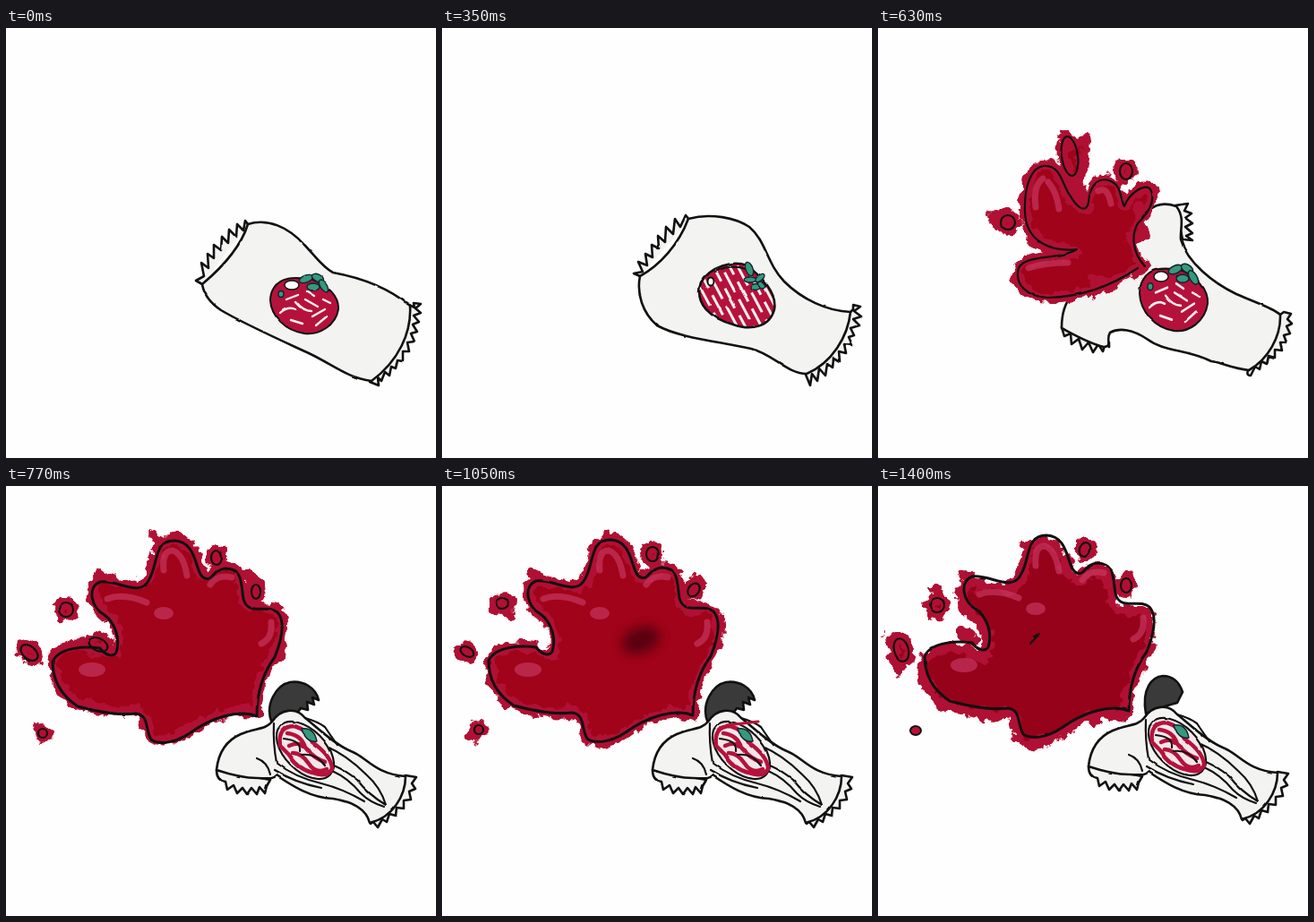
These frames come from a looping animation (480 px wide and 480 px high, 1.47 s). An HTML page without scripts:

```html
<!DOCTYPE html>
<html lang="en">
<head>
<meta charset="utf-8">
<title>Ketchup packet</title>
<style>
html, body { margin: 0; width: 100%; height: 100%; overflow: hidden; background: #fefefe; }
svg { display: block; width: 100%; height: 100%; }
path, ellipse { stroke-linecap: round; stroke-linejoin: round; }

.paper { fill: #f3f3f1; stroke: #111; stroke-width: 2.6; }
.line { fill: none; stroke: #111; stroke-width: 3; }
.fine { stroke-width: 2.2; }
.paint { fill: #a0031a; stroke: #b01033; stroke-width: 12; }
.dark { fill: #96021a; }
.shine { fill: none; stroke: #c93a64; stroke-width: 7; opacity: .65; }
.shine ellipse { fill: #c93a64; stroke: none; }
.skin { fill: #b5123b; stroke: #111; stroke-width: 2; }
.gloss { fill: none; stroke: #f6eef0; stroke-width: 2.4; }
.leaf { fill: #35997a; stroke: #123; stroke-width: 1.4; }
.scribble { fill: none; stroke: #b5123b; stroke-width: 4.5; }
.cap { fill: #3a3a3a; stroke: #111; stroke-width: 2.6; }
.ink { filter: url(#ink); }

/* Each tick is 70 ms; --k is the tick on which a drawing appears. */
.tick, .four, .eight, .nine {
  animation: tick 1470ms steps(1) infinite;
  animation-delay: calc(var(--k) * 70ms - 1471ms);
}
.four { animation-name: four; }
.eight { animation-name: eight; }
.nine { animation-name: nine; }
@keyframes tick { 0% { opacity: 1 } 4.7619%, 100% { opacity: 0 } }
@keyframes four { 0% { opacity: 1 } 19.0476%, 100% { opacity: 0 } }
@keyframes eight { 0% { opacity: 1 } 38.0952%, 100% { opacity: 0 } }
@keyframes nine { 0% { opacity: 1 } 42.8571%, 100% { opacity: 0 } }

.boil { animation: boil 210ms steps(1) infinite; animation-delay: calc(var(--k) * 70ms - 211ms); }
@keyframes boil { 0% { opacity: 1 } 33.3333%, 100% { opacity: 0 } }

.body, .left, .right { animation: swell 1470ms -1ms infinite; }
.left { animation-name: frill-left; }
.right { animation-name: frill-right; }
@keyframes swell {
  0% { animation-timing-function: steps(5);
    d: path("M270 219C292 212 315 222 333 242C343 252 353 267 365 273C398 279 428 291 451 310C453 340 438 372 408 394C382 391 365 376 340 364C310 350 265 330 240 315C228 307 221 298 219 286C238 270 262 245 270 219Z") }
  23.8095% { animation-timing-function: steps(3);
    d: path("M275 213C300 206 328 212 343 222C362 238 362 262 382 283C402 303 430 316 456 317C453 345 435 374 407 386C385 386 370 364 345 358C310 350 265 346 240 332C224 318 217 297 221 277C243 265 264 242 275 213Z") }
  38.0952%, 100% {
    d: path("M275 211C302 198 338 202 352 220C370 240 364 268 386 288C404 306 430 317 456 317C453 345 435 374 407 386C387 386 368 368 345 364C310 360 260 358 236 340C216 324 213 297 221 277C243 265 264 242 275 211Z") }
}
@keyframes frill-left {
  0% { animation-timing-function: steps(5);
    d: path("M270 219L267 215L265 226L258 219L257 233L249 225L248 240L241 233L240 248L232 242L232 257L225 252L226 268L218 262L221 277L212 282L219 286") }
  23.8095%, 100% {
    d: path("M276 214L272 209L266 222L260 213L258 230L250 222L249 239L241 232L242 246L234 242L235 256L227 252L229 265L219 261L224 272L214 274L221 277") }
}
@keyframes frill-right {
  0% { animation-timing-function: steps(5);
    d: path("M450 309L456 312L455 307L463 308L457 313L463 318L455 321L461 328L454 331L459 339L452 341L456 350L448 351L450 361L443 361L443 371L437 370L435 380L430 378L428 388L423 384L419 394L415 390L416 399L406 395") }
  23.8095%, 100% {
    d: path("M456 317L459 314L459 309L467 311L460 316L468 322L459 325L466 332L456 335L460 343L454 345L458 354L449 353L451 363L443 361L444 372L437 368L436 379L430 375L428 388L421 380L419 394L413 386L411 399L406 387") }
}
</style>
</head>
<body>
<svg viewBox="0 0 480 480">
<defs>
  <filter id="ink" x="-10%" y="-10%" width="120%" height="120%" color-interpolation-filters="sRGB">
    <feTurbulence type="fractalNoise" baseFrequency=".06" numOctaves="2" seed="4"/>
    <feDisplacementMap in="SourceGraphic" scale="2" xChannelSelector="R" yChannelSelector="G"/>
  </filter>
  <filter id="rag1" x="-10%" y="-10%" width="120%" height="120%" color-interpolation-filters="sRGB">
    <feTurbulence type="fractalNoise" baseFrequency=".08" numOctaves="3" seed="2"/>
    <feDisplacementMap in="SourceGraphic" scale="14" xChannelSelector="R" yChannelSelector="G"/>
  </filter>
  <filter id="rag2" x="-10%" y="-10%" width="120%" height="120%" color-interpolation-filters="sRGB">
    <feTurbulence type="fractalNoise" baseFrequency=".08" numOctaves="3" seed="7"/>
    <feDisplacementMap in="SourceGraphic" scale="14" xChannelSelector="R" yChannelSelector="G"/>
  </filter>
  <filter id="rag3" x="-10%" y="-10%" width="120%" height="120%" color-interpolation-filters="sRGB">
    <feTurbulence type="fractalNoise" baseFrequency=".08" numOctaves="3" seed="11"/>
    <feDisplacementMap in="SourceGraphic" scale="16" xChannelSelector="R" yChannelSelector="G"/>
  </filter>
  <filter id="soft" x="-50%" y="-50%" width="200%" height="200%"><feGaussianBlur stdDeviation="6"/></filter>
  <pattern id="hatch" width="16" height="34" patternUnits="userSpaceOnUse" patternTransform="rotate(-28)">
    <path fill="#f6eef0" d="M0 0h16v34h-16z"/>
    <path fill="#b5123b" d="M0 0h5v34h-5zM8 0h5v34h-5zM5 6h3v9h-3zM13 22h3v9h-3z"/>
  </pattern>

  <g id="tomato">
    <path class="skin" d="M299 290C308 276 325 279 340 280C360 287 372 300 371 314C368 332 350 343 333 341C312 338 296 322 295 304Q295 296 299 290Z"/>
    <path class="gloss" d="M306 318q8-8 18-4M313 303l13-5M324 306q8 10 17 10M334 303l14 8M342 322l14-8M318 326l13 4M346 332l12-10M336 294l8 5M354 303l8 4"/>
    <ellipse cx="319" cy="287" rx="8" ry="5" fill="#fff" stroke="#111" stroke-width="1.4"/>
    <g class="leaf">
      <ellipse cx="307" cy="297" rx="3" ry="3.5"/>
      <ellipse cx="335" cy="280" rx="8" ry="4" transform="rotate(-20 335 280)"/>
      <ellipse cx="348" cy="279" rx="7" ry="4" transform="rotate(25 348 279)"/>
      <ellipse cx="343" cy="289" rx="7" ry="4"/>
      <ellipse cx="355" cy="288" rx="4" ry="8" transform="rotate(-35 355 288)"/>
    </g>
  </g>
  <g id="hatched">
    <path d="M289 284C300 266 325 259 340 265C360 280 374 296 371 314C366 334 345 338 325 331C300 324 281 308 289 284Z" fill="url(#hatch)" stroke="#111" stroke-width="2.6"/>
    <path class="line fine" d="M305 272q16-9 34-3l7 7"/>
    <ellipse cx="300" cy="283" rx="3.5" ry="4.5" fill="#fff" stroke="#111" stroke-width="2"/>
    <g class="leaf">
      <ellipse cx="343" cy="269" rx="4" ry="8" transform="rotate(-20 343 269)"/>
      <ellipse cx="344" cy="281" rx="7" ry="3"/>
      <ellipse cx="355" cy="279" rx="6" ry="3" transform="rotate(-40 355 279)"/>
      <ellipse cx="350" cy="289" rx="5" ry="3.5"/>
      <ellipse cx="357" cy="287" rx="5" ry="3" transform="rotate(35 357 287)"/>
    </g>
  </g>

  <g id="torn" class="ink">
    <g class="paper">
      <path d="M332 198l14-2-4 8 8 3-7 5 8 6-8 4 8 7-7 3 7 5-11-1Z"/>
      <path d="M449 320l4-3 8 2-4 6 5 5-6 3 4 8-7 2 3 8-7 0 2 9-8-1 0 9-7-2-2 9-6-3-2 9-5-3-5 10q-6 0-2-8Z"/>
      <path d="M205 334l3 10 7-3 1 12 8-6 4 12 7-8 5 11 6-9 5 8 3-9 4 4 0-5Z"/>
      <path d="M303 203C312 195 324 196 333 199C343 212 337 224 338 236C345 262 375 285 400 297C425 308 440 312 449 320C450 345 435 370 414 382C395 380 385 374 372 372C345 358 320 362 300 347C285 337 270 334 259 340C254 348 262 356 252 356C235 352 218 342 205 335C205 318 210 305 217 298C235 280 260 268 293 265C282 245 282 215 303 203Z"/>
    </g>
    <use href="#tomato" transform="translate(-3 -44) scale(1 1.12)"/>
  </g>
  <g id="spurt-shape">
    <path d="M298 266C283 250 283 230 290 218C300 208 310 195 305 182C300 170 280 185 275 199C270 190 272 178 262 172C250 165 236 172 235 195C232 208 222 200 215 188C205 175 205 153 185 154C172 155 163 175 164 205C165 240 195 250 222 247C200 260 165 252 157 268C152 285 165 300 190 301C230 300 265 285 290 268"/>
    <ellipse cx="214" cy="143" rx="9" ry="22" transform="rotate(-8 214 143)"/>
    <ellipse cx="277" cy="160" rx="7" ry="9"/>
    <ellipse cx="145" cy="217" rx="8" ry="8"/>
  </g>
  <g id="spurt">
    <g class="paint" filter="url(#rag1)">
      <use href="#spurt-shape"/>
      <path d="M206 136l18 56 8-66zM129 210l14 2M186 246l36 4M290 200l8 30-10 6M240 280l20 8"/>
    </g>
    <path class="shine" d="M176 200q-3-24 8-32M190 172q10 12 12 30M168 268q18-6 44-6M246 182q10-6 14 14"/>
    <use href="#spurt-shape" class="line fine ink"/>
  </g>

  <path id="blob" d="M280 256C280 235 285 210 300 190C308 170 312 150 303 140C292 130 270 145 265 125C262 108 265 92 245 91C230 92 232 105 222 102C210 98 215 61 188 60C165 60 170 85 160 103C150 125 125 103 105 106C90 112 95 135 110 143C122 152 128 170 123 185C118 192 108 185 105 180C90 178 60 178 52 195C52 220 65 235 80 245C105 252 130 255 145 253C160 255 155 270 162 282C172 289 190 285 205 275C230 257 260 248 280 256Z"/>
  <g id="shine" class="shine">
    <path d="M176 94q-2-22 10-22q12 4 16 28M113 126q18-7 44 4M228 110q8-12 24-8M285 176q13-6 11-24"/>
    <ellipse cx="176" cy="142" rx="11" ry="7"/>
    <ellipse cx="96" cy="205" rx="15" ry="8"/>
  </g>
  <g id="drops1">
    <ellipse cx="235" cy="76" rx="7" ry="8"/>
    <ellipse cx="67" cy="131" rx="7" ry="6"/>
    <ellipse cx="28" cy="185" rx="8" ry="5" transform="rotate(30 28 185)"/>
    <ellipse cx="41" cy="272" rx="5" ry="5"/>
    <ellipse cx="281" cy="116" rx="6" ry="8" transform="rotate(35 281 116)"/>
  </g>
  <g id="drops2">
    <ellipse cx="235" cy="80" rx="6" ry="8"/>
    <ellipse cx="67" cy="138" rx="8" ry="8"/>
    <ellipse cx="103" cy="177" rx="11" ry="7" transform="rotate(25 103 177)"/>
    <ellipse cx="26" cy="186" rx="11" ry="7" transform="rotate(40 26 186)"/>
    <ellipse cx="41" cy="276" rx="5" ry="5"/>
    <ellipse cx="279" cy="118" rx="5" ry="8"/>
  </g>
  <g id="drops3">
    <ellipse cx="231" cy="71" rx="6" ry="8" transform="rotate(20 231 71)"/>
    <ellipse cx="66" cy="133" rx="8" ry="8"/>
    <ellipse cx="26" cy="183" rx="8" ry="13" transform="rotate(-15 26 183)"/>
    <ellipse cx="277" cy="111" rx="6" ry="8"/>
  </g>

  <path id="cap" class="cap" d="M297 265C288 244 302 222 317 219C332 217 346 225 349 239l-7-3 2 8-8-3 1 9-8-2C326 256 312 254 297 265Z"/>
  <g id="crushed" class="ink">
    <g class="paper">
      <path d="M235 317q0 12 10 13l2 9 7-5 4 9 6-6 5 7 5-7 6 7 3-8 6 7 2-8 4-7Z"/>
      <path d="M446 323l12 2-5 7 4 6-7 3 2 9-8 1 0 9-8-1-1 9-7-2-3 9-5-3-5 9-5-6-3 2-3-14Z"/>
      <path d="M235 317C237 298 246 284 262 277C278 270 290 272 297 263C306 249 324 246 334 259C348 270 366 288 385 296C402 302 412 322 446 324C446 345 432 370 406 376C402 360 385 352 365 349C340 348 320 335 302 323C298 328 290 326 280 326C265 326 250 322 235 317Z"/>
    </g>
    <path class="line fine" d="M280 304q12 4 15 18M299 265q-1 22 3 44 20 16 50 23 24 6 48 20M334 259q14 4 22 10 8 12 14 20M356 290q24 10 46 32 16 14 22 34-20-12-32-28-12-10-26-16M364 318q18 8 32 25 10 10 26 15M300 317q22 14 52 20"/>
    <ellipse cx="334" cy="295" rx="39" ry="23" transform="rotate(45 334 295)" fill="#f3e6e8" stroke="#111" stroke-width="2.2"/>
    <path class="scribble" d="M306 290q-3-22 16-22 14 4 20 18 22 16 22 30-6 10-22 4-16-4-26-20zM314 276q16 2 20 16M316 290q12-6 20 4t20 14M320 298q10 0 18 12t20 6"/>
    <path class="line fine" d="M310 282q20 2 18 14M330 300q16-2 26 12"/>
    <path class="leaf" d="M330 271q14-2 17 14-12 2-17-14"/>
  </g>

  <g id="splash2">
    <g class="paint" filter="url(#rag2)">
      <path d="M166 54l12 14M102 100l18 6M60 204l14 26M154 264l10 16M308 156l-2 30M268 100l14 8"/>
      <use href="#blob" y="-2"/><use href="#drops2"/>
    </g>
    <use href="#shine"/>
    <g class="line ink"><use href="#blob" y="1"/><use href="#drops2" class="fine"/></g>
  </g>
  <g id="pose2">
    <use href="#cap"/>
    <use href="#crushed"/>
    <use href="#splash2"/>
  </g>
</defs>

<g class="eight" style="--k:0">
  <g class="paper ink">
    <path class="left"/><path class="right"/><path class="body"/>
  </g>
  <g class="four ink" style="--k:0"><use href="#tomato"/></g>
  <g class="four ink" style="--k:4"><use href="#hatched"/></g>
</g>

<g class="tick" style="--k:8">
  <use href="#torn"/>
  <use href="#spurt" transform="translate(285 260) scale(.69 .63) translate(-285 -260)"/>
</g>
<g class="tick" style="--k:9"><use href="#torn"/><use href="#spurt"/></g>
<g class="tick" style="--k:10">
  <use href="#cap"/>
  <use href="#crushed"/>
  <use href="#splash2" transform="translate(285 256) scale(.85) translate(-285 -256)"/>
</g>
<g class="tick" style="--k:11"><use href="#pose2"/></g>

<g class="nine" style="--k:12">
  <g class="boil" style="--k:0">
    <use href="#cap"/>
    <use href="#crushed"/>
    <path class="line" style="stroke:#b5123b" d="M318 267l35-4"/>
    <g class="paint" filter="url(#rag1)">
      <path d="M182 54l10 14M100 98l16 8M284 104l4 8M60 136l16 8M62 210l10 18M34 282l10-6"/>
      <use href="#blob" x="1"/><use href="#drops1"/>
    </g>
    <ellipse cx="222" cy="172" rx="22" ry="14" transform="rotate(-20 222 172)" fill="#4a0510" opacity=".8" filter="url(#soft)"/>
    <use href="#shine"/>
    <g class="line ink"><use href="#blob"/><use href="#drops1" class="fine"/></g>
  </g>
  <g class="boil" style="--k:1"><use href="#pose2"/></g>
  <g class="boil" style="--k:2">
    <path class="cap" d="M299 254C294 226 306 213 318 212Q334 212 340 230L334 242Q318 246 299 254Z"/>
    <use href="#crushed" y="-4"/>
    <g class="paint dark" filter="url(#rag3)">
      <path d="M162 68l10 12M96 98l10 10M250 92l12 12M92 162l16 10M54 204l14 26M64 116l4 30M14 170l10 36M290 138l10 4"/>
      <use href="#blob" x="-3" y="2"/><use href="#drops3"/>
    </g>
    <use href="#shine" y="-5"/>
    <g class="line ink">
      <use href="#blob" y="-5"/><use href="#drops3" class="fine"/>
      <path class="fine" d="M170 176l10-11M174 168l6-3"/>
    </g>
    <ellipse cx="42" cy="273" rx="6" ry="5" fill="#b81237" stroke="#111" stroke-width="2"/>
  </g>
</g>
</svg>
</body>
</html>
```
